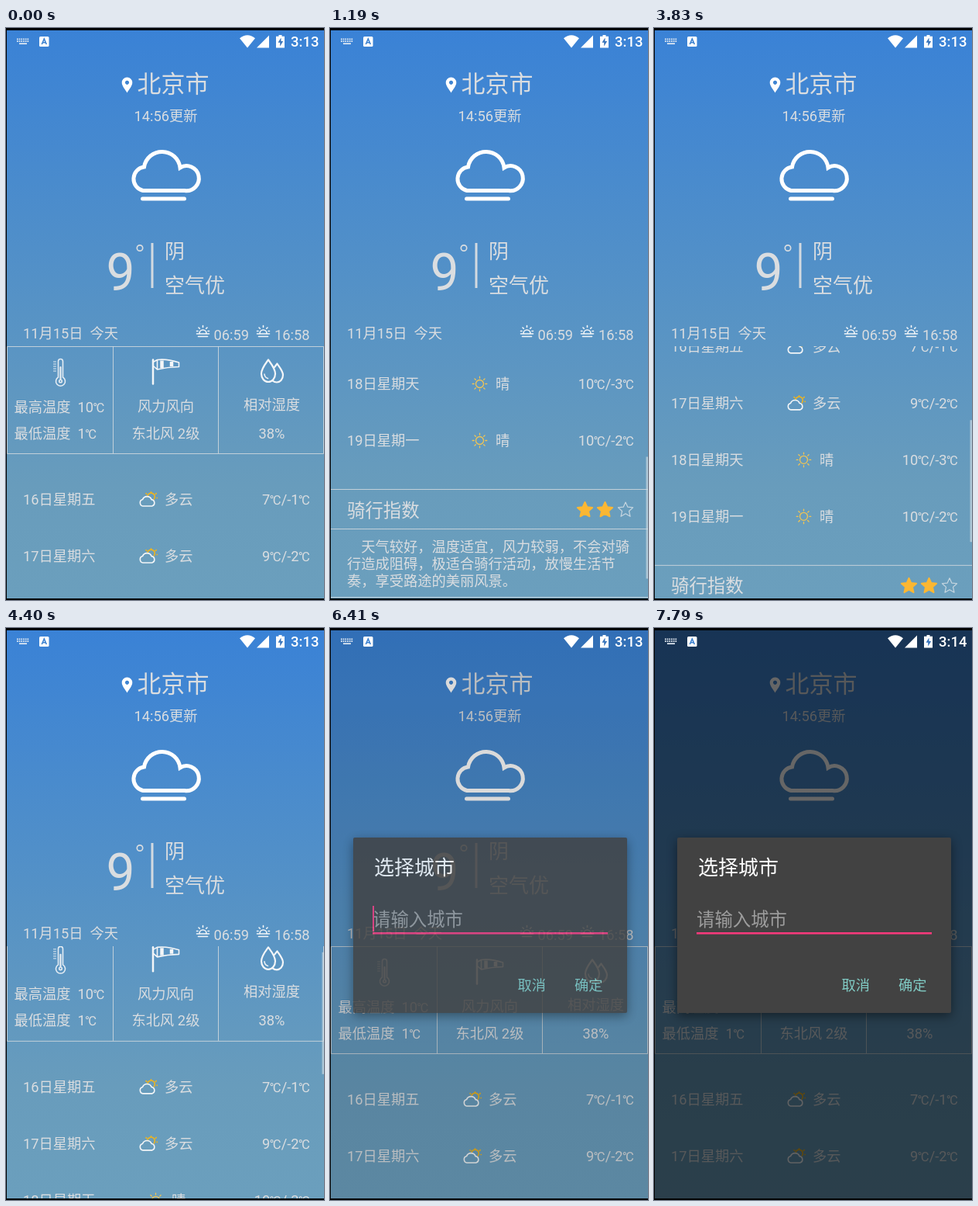
These frames come from a looping animation (411x737 px, 8 s). An HTML page:

```html
<!DOCTYPE html>
<html lang="zh-CN">
<head>
<meta charset="utf-8">
<title>天气</title>
<style>
@property --scroll { syntax: '<number>'; inherits: true; initial-value: 0; }
html, body { margin: 0; width: 100%; height: 100%; overflow: hidden; background: #000; }
svg.stage {
  display: block; width: 100vw; height: 100vh;
  font: 18.25px Roboto, 'Noto Sans CJK SC', 'Noto Sans CJK', sans-serif;
  animation: scroll 8s infinite linear;
}
text { fill: #dadde0; white-space: pre; }
.mid { text-anchor: middle; }
.end { text-anchor: end; }
.deg { font-size: 16.5px; }
.line { fill: none; stroke: #d3dade; stroke-opacity: .85; }
.icon { fill: none; stroke: #f4f6f8; stroke-width: 1.6; stroke-linecap: round; stroke-linejoin: round; }
.sun { fill: none; stroke: #f3c552; stroke-width: 1.3; stroke-linecap: round; }

.list { transform: translateY(calc(var(--scroll) * -1px)); }
.thumb {
  fill: #d3dde4; fill-opacity: .65;
  transform: translateY(calc(var(--scroll) * .483px));
  animation: thumb 8s infinite step-end;
}
.glow { fill: #3f51b5; opacity: 0; }
.glow.bottom { animation: glowBottom 8s infinite linear; }
.glow.top { animation: glowTop 8s infinite linear; }
.dim { animation: dim 8s infinite linear; }
.dialog { animation: dialog 8s infinite linear; filter: drop-shadow(0 4px 7px rgba(0,0,0,.45)); }
.cursor { fill: #f5397b; animation: blink 8s infinite step-end; }
.clock { font-weight: 500; font-size: 18.5px; fill: #fff; }
.before { animation: before 8s infinite step-end; }
.after { animation: after 8s infinite step-end; }

@keyframes scroll {
  0%, 5.875% { --scroll: 0; animation-timing-function: cubic-bezier(.35,.1,.45,1); }
  14.875%, 18.25% { --scroll: 295; animation-timing-function: cubic-bezier(.3,.3,.5,1); }
  23.125%, 44.875% { --scroll: 348; animation-timing-function: cubic-bezier(.5,.1,.75,.7); }
  47.875% { --scroll: 198; animation-timing-function: cubic-bezier(.25,.3,.5,.95); }
  50.5%, 52.75% { --scroll: 48; animation-timing-function: cubic-bezier(.35,.2,.5,1); }
  57.25%, 100% { --scroll: 0; }
}
@keyframes thumb {
  0% { opacity: 0; } 6.25% { opacity: 1; } 29.5% { opacity: 0; }
  45.25% { opacity: 1; } 67.75%, 100% { opacity: 0; }
}
@keyframes glowBottom { 0%, 22% { opacity: 0; } 24% { opacity: .13; } 28.375%, 100% { opacity: 0; } }
@keyframes glowTop { 0%, 58.75% { opacity: 0; } 61.5% { opacity: .13; } 67.75%, 100% { opacity: 0; } }
@keyframes dim {
  0%, 79% { opacity: 0; } 80.125% { opacity: .14; } 80.875% { opacity: .38; }
  81.625%, 100% { opacity: .6; }
}
@keyframes dialog {
  0%, 79% { opacity: 0; } 79.375% { opacity: .4; } 80.125% { opacity: .83; }
  80.875%, 100% { opacity: 1; }
}
@keyframes blink {
  0% { opacity: 1; } 85.375% { opacity: 0; } 91.375% { opacity: 1; } 97.375%, 100% { opacity: 0; }
}
@keyframes before { 0% { opacity: 1; } 97%, 100% { opacity: 0; } }
@keyframes after { 0% { opacity: 0; } 97%, 100% { opacity: 1; } }
</style>
</head>
<body>
<svg class="stage" viewBox="0 0 411 737">
  <defs>
    <linearGradient id="sky" x1="0" y1="0" x2="0" y2="1">
      <stop offset="0" stop-color="#3a82d6"/>
      <stop offset=".5" stop-color="#5793c5"/>
      <stop offset=".8" stop-color="#689cbc"/>
      <stop offset="1" stop-color="#6b9fbd"/>
    </linearGradient>
    <clipPath id="view"><rect x="1" y="410" width="410" height="325"/></clipPath>
    <g id="rise" class="icon">
      <path d="M-4.5 2.5a4.5 4.5 0 1 1 9 0M-8 3h16M-6 6.5h12M0-7.5v2M-5.5-5l1.3 1.3M5.5-5l-1.3 1.3M-8-.5h1.5M8-.5h-1.5"/>
    </g>
    <g id="sunny" class="sun">
      <circle r="5"/>
      <path d="M0-9.3v2M0 9.3v-2M-9.3 0h2M9.3 0h-2M-6.6-6.6l1.4 1.4M6.6 6.6l-1.4-1.4M-6.6 6.6l1.4-1.4M6.6-6.6l-1.4 1.4"/>
    </g>
    <g id="cloudy">
      <path class="sun" style="stroke:#f0b41c;stroke-width:1.6" d="M0-5a4.8 4.8 0 1 1 8.3 4.5M4.5-9v-.6M-1.2-7l-.8-.8M10.3-7l.9-.9M12-2h.4"/>
      <path class="icon" d="M-6 8.5a4.3 4.3 0 0 1-.5-8.4a6.2 6.2 0 0 1 11.6 0a4.3 4.3 0 0 1 .6 8.4z"/>
    </g>
    <path id="star" stroke-linejoin="round" d="M0-9.5L2.8-3.3 9.6-2.6 4.5 2 6 8.8 0 5.3-6 8.8-4.5 2-9.6-2.6-2.8-3.3z"/>
  </defs>

  <rect x="1" y="3" width="410" height="732" fill="url(#sky)"/>

  <!-- current weather -->
  <path fill="#fff" fill-rule="evenodd" d="M156.500 63.500a6.800 6.800 0 0 1 6.800 6.800c0 4.500-4.300 9-6.800 13.200c-2.500-4.200-6.800-8.700-6.800-13.200a6.800 6.800 0 0 1 6.800-6.800zm0 4.200a2.600 2.600 0 1 0 .01 0z"/>
  <text x="169.500" y="82.500" font-size="31">北京市</text>
  <text class="mid" x="206.500" y="120">14:56更新</text>
  <g fill="none" stroke="#fff" stroke-width="5" stroke-linecap="round">
    <path d="M177 209.500A15.500 15.500 0 0 1 178.500 179A23.500 23.500 0 0 1 225 180A16 16 0 1 1 231 209.500Z"/>
    <path d="M176.500 220H230.500"/>
  </g>
  <text class="mid" x="148" y="338" font-size="66">9</text>
  <circle cx="173" cy="283.500" r="3.700" fill="none" stroke="#dadde0" stroke-width="1.700"/>
  <rect x="187.500" y="277" width="3" height="58" fill="#d3dae0"/>
  <text x="205" y="297" font-size="26">阴</text>
  <text x="205" y="341" font-size="26">空气优</text>
  <text x="22" y="399.500">11月15日  今天</text>
  <use href="#rise" x="254.500" y="391"/>
  <text x="268.500" y="402">06:59</text>
  <use href="#rise" x="332.500" y="391"/>
  <text class="end" x="392.500" y="402">16:58</text>

  <!-- scrolling details -->
  <g clip-path="url(#view)">
    <g class="list">
      <path class="line" d="M1.500 410.500H410.500V548.500H1.500zM138.500 410V548M274.500 410V548"/>
      <g class="icon" style="stroke-opacity:.9">
        <path d="M67.500 450V429.500a3 3 0 0 1 6 0V450a6 6 0 1 1-6 0z"/>
        <path d="M70.500 437v15" stroke-width="2.200"/>
        <circle cx="70.500" cy="455" r="1.800"/>
        <path d="M61.500 430h3M61.500 433h3M61.500 436h3M61.500 439h3M61.500 442h3" stroke-width="1"/>
      </g>
      <text x="10.500" y="494.500">最高温度  10<tspan class="deg">℃</tspan></text>
      <text x="10.500" y="528.500">最低温度  1<tspan class="deg">℃</tspan></text>

      <g class="icon">
        <path d="M190 427.500V458.500" stroke-width="2.500"/>
        <path d="M191 430l4.500-2.500v12.500L191 436M195.500 427.500Q208 426 223.500 431v5.500Q208 437 195.500 440z"/>
        <path d="M201.500 428.500v9.500M214 430v6" stroke-width="4.500" stroke-linecap="butt"/>
      </g>
      <text class="mid" x="206.500" y="494">风力风向</text>
      <text class="mid" x="206.500" y="528.500">东北风 2级</text>

      <g class="icon" stroke-width="2" style="stroke-width:2.200">
        <path d="M339 427.500c4 5.500 9 11.500 9 18a9 10.500 0 0 1-18 0c0-6.500 5-12.500 9-18z"/>
        <path d="M347 437l3.500-4.500c3 4.500 7.500 9.500 7.500 14.500c0 6-4 9.500-8 9.500q-3 0-5.500-2"/>
        <path d="M334 446q.5 4.500 4.500 5.500" stroke-width="1.500"/>
      </g>
      <text class="mid" x="343.500" y="491.500">相对湿度</text>
      <text class="mid" x="343.500" y="528.500">38%</text>

      <g id="days"></g>

      <path class="line" d="M1 889.500H411M1 940.500H411M1 1028.500H411"/>
      <text x="22" y="924.500" font-size="23.400">骑行指数</text>
      <g fill="#fbb733" stroke="#fbb733" stroke-width="2">
        <use href="#star" x="329.500" y="915.500"/>
        <use href="#star" x="355.500" y="915.500"/>
      </g>
      <use href="#star" x="382" y="915.500" fill="none" stroke="#c6d6e0" stroke-width="1.200"/>
      <text x="40.250" y="970">天气较好，温度适宜，风力较弱，不会对骑</text>
      <text x="22" y="992">行造成阻碍，极适合骑行活动，放慢生活节</text>
      <text x="22" y="1014">奏，享受路途的美丽风景。</text>
      <text class="mid" x="207" y="1057.500">XN骑行</text>
    </g>
    <ellipse class="glow top" cx="206" cy="410" rx="240" ry="62"/>
    <ellipse class="glow bottom" cx="206" cy="735" rx="240" ry="62"/>
    <rect class="thumb" x="408.500" y="410" width="2.500" height="157"/>
  </g>

  <!-- city picker -->
  <rect class="dim" x="1" y="3" width="410" height="732"/>
  <g class="dialog">
    <rect x="30" y="270" width="354" height="226" rx="2" fill="#424242"/>
    <text x="57" y="318" font-size="26" style="fill:#fff">选择城市</text>
    <text x="55" y="383.500" font-size="23.400" style="fill:#9d9d9d">请输入城市</text>
    <rect x="55" y="392" width="304" height="2.600" fill="#f5397b"/>
    <rect class="cursor" x="55" y="358" width="2" height="33"/>
    <g font-weight="500">
      <text x="242.500" y="467" style="fill:#80cbc4">取消</text>
      <text x="316" y="467" style="fill:#80cbc4">确定</text>
    </g>
  </g>

  <!-- status bar -->
  <g fill="none" stroke="#e4ebf3" stroke-width="1.700" stroke-dasharray="1.700 1">
    <path d="M14 14.300H30M14 17.200H30"/>
    <path d="M17 20.200H27" stroke-dasharray="none"/>
  </g>
  <rect x="43" y="11" width="12.500" height="13" rx="1.500" fill="#fff"/>
  <path d="M46.300 21l3-7 3 7M47.500 18.800h3.600" fill="none" stroke="#3a80d0" stroke-width="1.600"/>
  <path d="M302 13.200Q312 5.500 322 13.200L312 25.500z" fill="#fff"/>
  <path d="M340 9.500V25.500H324z" fill="#fff"/>
  <path d="M352.500 9h4v1.700h3.500V25.500h-11V10.700h3.500z" fill="#fff"/>
  <path d="M355.500 12.500l-4 6.300h2.700v4.700l4-6.500h-2.700z" fill="#3a76bd"/>
  <text class="clock before" x="368" y="24">3:13</text>
  <text class="clock after" x="368" y="24">3:14</text>
</svg>
<script>
const days = [
  ['16日星期五', '多云', '7℃/-1℃'],
  ['17日星期六', '多云', '9℃/-2℃'],
  ['18日星期天', '晴', '10℃/-3℃'],
  ['19日星期一', '晴', '10℃/-2℃'],
];
const degrees = s => s.replaceAll('℃', '<tspan class="deg">℃</tspan>');
document.getElementById('days').innerHTML = days.map(([date, sky, range], i) => {
  const y = 607 + 73 * i;
  const [icon, iconX, skyX] = sky === '晴' ? ['sunny', 193.5, 214] : ['cloudy', 183, 205];
  return `<text x="22" y="${y + 7}">${date}</text>
    <use href="#${icon}" x="${iconX}" y="${y + .5}"/>
    <text x="${skyX}" y="${y + 7}">${sky}</text>
    <text class="end" x="393" y="${y + 7}">${degrees(range)}</text>`;
}).join('');
</script>
</body>
</html>
```
